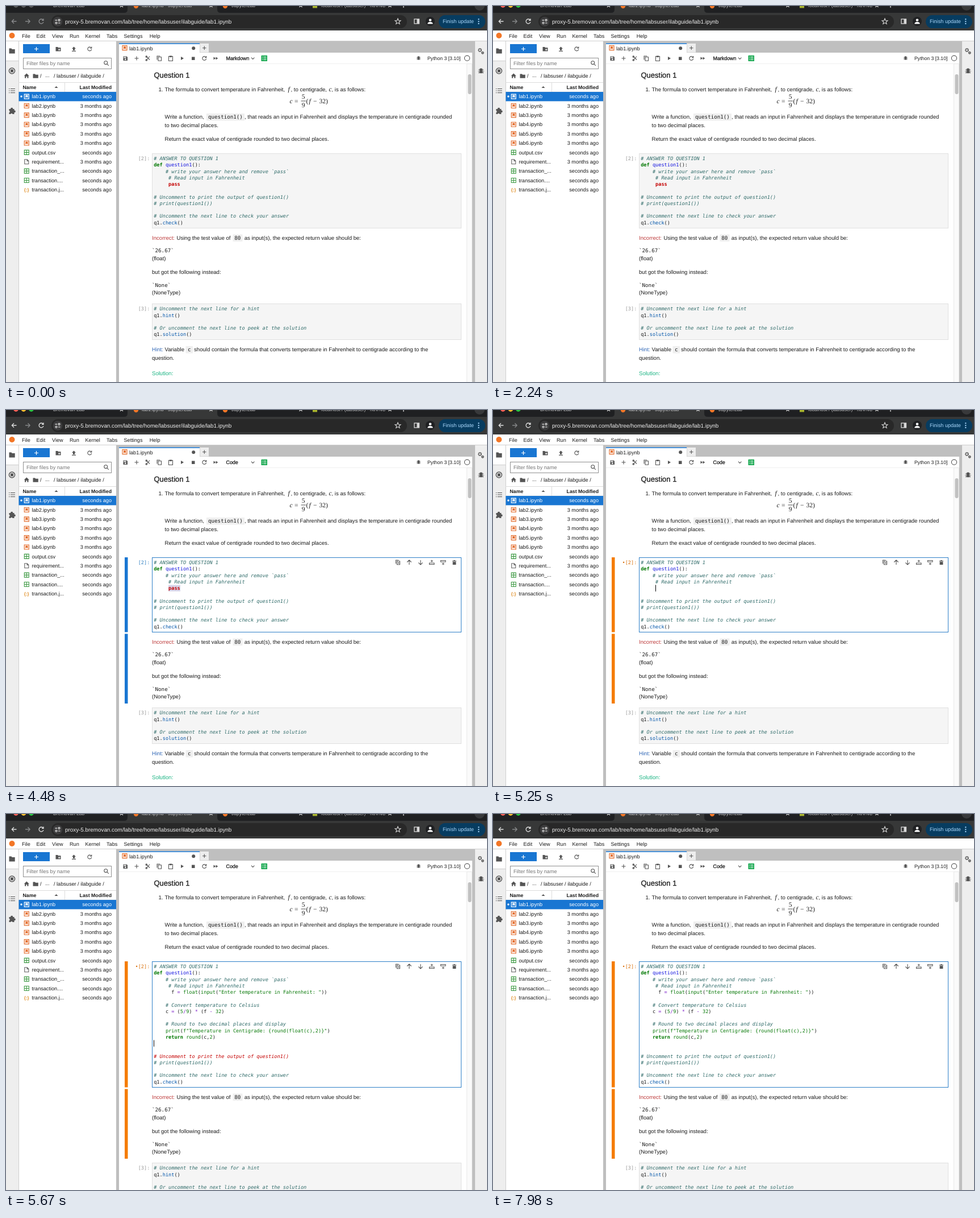
An HTML page that plays this animation: 847x661 px, repeating every 8000 ms.

```html
<!DOCTYPE html>
<html lang="en">
<head>
<meta charset="utf-8">
<title>Notebook lab</title>
<style>
html, body { margin: 0; width: 100%; height: 100%; overflow: hidden; background: #fff; }
svg { display: block; width: 847px; height: 661px; text-rendering: geometricPrecision; }
text { font: 9.15px "Liberation Sans", Arial, sans-serif; fill: #1c1c1c; white-space: pre; }
.tab { font-size: 8.5px; fill: #c6c7c9; }
.url { font-size: 9.85px; fill: #ececec; }
.bold { font-size: 8.75px; font-weight: 700; }
.medium { stroke: #1c1c1c; stroke-width: .3px; }
.end { text-anchor: end; }
.body text { font-size: 9.6px; }
.body text.serif { font: 11.5px "Liberation Serif", Times, serif; }
.body text.it { font-style: italic; }
.body text.title { font-size: 13px; }
.body text.mono { font: 9.2px "DejaVu Sans Mono", monospace; }
.body text.code { font: 8.6px "DejaVu Sans Mono", monospace; }
.body text.prompt { fill: #9a9a9a; }
.com { fill: #2f6b69; font-style: italic; }
.key { fill: #007800; font-weight: 700; }
.bad { fill: #c40000; font-weight: 700; }
.str, .fun, .num { fill: #0a7a0a; }
.def { fill: #1414e0; }
.prop { fill: #0055aa; }
.op { fill: #7d1fc8; }
.chip { fill: #efefef; }
.line { fill: none; stroke: #555; stroke-width: 1.1; }
.solid { fill: #555; }
.pale { fill: none; stroke: #d8d8d8; stroke-width: 1.3; }

.lamp, #nav, #cell, #bar1, #bar2, #lower, #prompt, #dot, #select, #caret,
.before, .after, #pass, #added, #warn tspan { animation: 8s step-end infinite; }

.lamp { fill: #57585a; animation-name: lamp; }
@keyframes lamp { 28% { fill: var(--on); } }
#nav { stroke: #8a8b8d; animation-name: nav; }
@keyframes nav { 28% { stroke: #dedede; } }

.before { animation-name: before; }
@keyframes before { 0% { opacity: 1; } 35% { opacity: 0; } }
.after { opacity: 0; animation-name: after; }
@keyframes after { 35% { opacity: 1; } }

#cell { fill: #f5f5f5; stroke: #e0e0e0; height: 131px; animation-name: cell, cellgrow; }
@keyframes cell { 35% { fill: #fff; stroke: #2f80c8; } }
@keyframes cellgrow { 70.875% { height: 221px; } }
#bar1 { height: 131.5px; }
#bar1, #bar2 { opacity: 0; fill: #1976d2; }
#bar1 { animation-name: bar, bargrow; }
#bar2 { animation-name: bar; }
@keyframes bar {
  35% { opacity: 1; fill: #1976d2; }
  65.625% { opacity: 1; fill: #f57c00; }
}
@keyframes bargrow { 70.875% { height: 221.5px; } }
#prompt { animation-name: prompt; }
@keyframes prompt { 35% { fill: #307fc1; } 65.625% { fill: #d9700c; } }
#dot { opacity: 0; fill: #d9700c; animation-name: dot; }
@keyframes dot { 65.625% { opacity: 1; } }

#pass { animation-name: pass; }
@keyframes pass { 0% { opacity: 1; } 65.625% { opacity: 0; } }
#select { opacity: 0; fill: #d8d5ea; animation-name: pick; }
@keyframes pick { 56% { opacity: 1; } 65.625% { opacity: 0; } }
#added { opacity: 0; animation-name: added; }
@keyframes added { 70.875% { opacity: 1; } }
#lower { animation-name: lower; }
@keyframes lower { 70.875% { transform: translateY(90px); } }
#warn tspan { animation-name: warn; }
@keyframes warn { 70% { fill: #c40000; } 76.125% { fill: #2f6b69; } }

#caret { opacity: 0; animation-name: caret; }
@keyframes caret {
  35% { opacity: 1; transform: translate(410px, 296px); }
  42% { opacity: 0; transform: translate(410px, 296px); }
  49% { opacity: 1; transform: translate(410px, 296px); }
  50.75% { opacity: 1; transform: translate(291px, 307.5px); }
  56% { opacity: 0; transform: translate(291px, 307.5px); }
  65.625% { opacity: 1; transform: translate(286px, 307.5px); }
  70.875% { opacity: 1; transform: translate(260px, 397.5px); }
  77.875% { opacity: 0; transform: translate(260px, 397.5px); }
  84.875% { opacity: 1; transform: translate(260px, 397.5px); }
  91.875% { opacity: 0; transform: translate(260px, 397.5px); }
  92.75% { opacity: 1; transform: translate(296px, 307.5px); }
  99.75% { opacity: 0; transform: translate(296px, 307.5px); }
}
</style>
</head>
<body>
<svg viewBox="0 0 847 661">
  <!-- browser chrome -->
  <path fill="#1f2022" d="M0 0H847V12H0z"/>
  <path fill="#373838" d="M0 12H208q6 0 6-6V0H372V6q0 6 6 6H847V43H0z"/>
  <circle class="lamp" style="--on:#fe5f57" cx="17.5" cy="-1.5" r="4.4"/>
  <circle class="lamp" style="--on:#febc2e" cx="31" cy="-1.5" r="4.4"/>
  <circle class="lamp" style="--on:#28c840" cx="44.5" cy="-1.5" r="4.4"/>
  <text class="tab" x="83" y="2.2">Bremovan Lab</text>
  <circle cx="229" cy="0" r="4.2" fill="#f37626"/>
  <text class="tab" x="239" y="2.2">lab1.ipynb - JupyterLab</text>
  <circle cx="386" cy="0" r="4.2" fill="#f37626"/>
  <text class="tab" x="397" y="2.2">JupyterLab</text>
  <rect x="540" y="-4" width="8" height="7.5" fill="#a9b42c"/>
  <text class="tab" x="555" y="2.2">localhost / (labsuser) - noVNC</text>
  <path class="pale" d="M201 -3l5 5m0-5l-5 5M358.5-3l5 5m0-5l-5 5M516.5-3l5 5m0-5l-5 5M673.5-3l5 5m0-5l-5 5M700 -4v7"/>
  <circle cx="834" cy="-1" r="9" fill="#38393b"/>
  <g id="nav" fill="none" stroke-width="1.3">
    <path d="M18.5 27H10.5M14 23.2L10.3 27L14 30.8"/>
    <path d="M65.5 24.8a4 4 0 1 0 .5 3.3M66 22.3v3h-3"/>
  </g>
  <path class="pale" style="stroke:#858688" d="M34 27h8M38.5 23.2L42.2 27L38.5 30.8"/>
  <rect x="80" y="16" width="626" height="23" rx="11.5" fill="#282828"/>
  <circle cx="91" cy="27.5" r="8.5" fill="#3c3c3d"/>
  <path class="pale" d="M86.5 25h3.5M92 29.8h3.5"/>
  <circle class="pale" cx="93.5" cy="25" r="1.5"/>
  <circle class="pale" cx="88.5" cy="29.8" r="1.5"/>
  <text class="url" x="104" y="30.6">proxy-5.bremovan.com/lab/tree/home/labsuser/ilabguide/lab1.ipynb</text>
  <path class="pale" id="star" style="stroke-width:1.1"/>
  <rect class="pale" x="719" y="23" width="8.5" height="8"/>
  <path fill="#d8d8d8" d="M723.5 23h4v8h-4z"/>
  <circle cx="747" cy="27" r="8" fill="#1f2022"/>
  <circle cx="747" cy="24.8" r="2.3" fill="#fff"/>
  <path fill="#fff" d="M742.3 31.5q0-3.5 4.7-3.5t4.7 3.5z"/>
  <rect x="762" y="16" width="82" height="23" rx="11.5" fill="#073c60"/>
  <text x="769" y="30.3" style="fill:#a9d7fb">Finish update</text>
  <path fill="#a9d7fb" d="M831.3 22.3h2v2h-2zM831.3 26.2h2v2h-2zM831.3 30.1h2v2h-2z"/>

  <!-- workspace -->
  <path fill="#eee" d="M0 62H22V661H0zM826 62H847V661H826z"/>
  <path fill="#fff" d="M0 62H22V96H0z"/>
  <path stroke="#cfcfcf" d="M0 61.5H847M0 96.5H22M22.5 62V661"/>
  <path fill="#bfbfbf" d="M194 62H826V661H194z"/>
  <path fill="#fff" d="M199 82H821V661H199zM199 65.5H341V82H199z"/>
  <path fill="#1976d2" d="M199 65.5H341V67H199z"/>
  <path fill="#ededed" d="M341.5 66H357V81.5H341.5z"/>
  <circle cx="10.5" cy="52" r="5" fill="#f37626"/>
  <g id="menu"></g>

  <!-- side icons -->
  <path class="solid" d="M5.5 74.5h4l1.2 1.5h5v7.5H5.5z"/>
  <circle cx="10.5" cy="114" r="5.8" fill="#555"/>
  <circle cx="10.5" cy="114" r="4.3" fill="#eee"/>
  <path class="solid" d="M8 111.5h5v5H8z"/>
  <path class="line" d="M5 145.5h1.5M8 145.5h8M5 149h1.5M8 149h8M5 152.5h1.5M8 152.5h8"/>
  <path class="solid" d="M5.5 181h2.8a1.9 1.9 0 1 1 3.7 0h2.5v2.6a1.8 1.8 0 1 1 0 3.5v3h-3a1.7 1.7 0 0 0-3.3 0H5.5v-2.8a1.7 1.7 0 0 0 0-3.3z"/>
  <circle class="line" cx="834.5" cy="77.5" r="2.4" stroke-dasharray="1.5 .4" style="stroke-width:2"/>
  <circle class="line" cx="839.3" cy="82.3" r="1.6" style="stroke-width:1.6"/>
  <g id="bug"><path class="solid" d="M834 110.5q2.5-2 5 0v6q-2.5 4-5 0z"/><path class="line" d="M832 112h9M831.5 114.7h10M832 117.4h9"/></g>

  <!-- file browser -->
  <rect x="30" y="67" width="47" height="16" fill="#1976d2"/>
  <path stroke="#fff" stroke-width="1.2" d="M50 75.5h7M53.5 72v7"/>
  <path class="solid" d="M87.5 72h3.5l1.2 1.3h4.3v6.2h-9z"/>
  <path stroke="#fff" d="M92 76.7h3.5M93.7 75v3.5"/>
  <path class="solid" d="M119.5 71.5l3.5 3.7h-2v2.8h-3v-2.8h-2zM116 78.8h7v1.2h-7z"/>
  <path class="line" d="M150 73.5a3.4 3.4 0 1 0 .6 2.6M150.8 71.5v2.7h-2.7"/>
  <rect x="30.5" y="91.5" width="155" height="19" fill="#fff" stroke="#8f8f8f"/>
  <text x="36" y="104.3" style="fill:#757575">Filter files by name</text>
  <circle class="line" cx="175.7" cy="99.7" r="2.9"/>
  <path class="line" d="M177.8 101.8l3 3"/>
  <path class="solid" d="M31.8 122.8l4.5-4.3l4.5 4.3h-1.3v3.9h-2.2v-2.7h-2v2.7h-2.2v-3.9z"/>
  <path class="solid" d="M47.5 119.5h3.5l1.2 1.3h4.6v6h-9.3z"/>
  <text x="60" y="125.8">/</text>
  <text x="69" y="125">...</text>
  <text x="84" y="125.8">/ labsuser / ilabguide /</text>
  <path stroke="#dcdcdc" d="M22 134.5H194M22 151H194M103.5 135V151"/>
  <text class="bold" x="29.5" y="146">Name</text>
  <path class="solid" d="M85.5 144l3-3l3 3z"/>
  <text class="bold end" x="186" y="146">Last Modified</text>
  <rect x="22.5" y="151" width="171.5" height="16.4" fill="#1976d2"/>
  <circle cx="27" cy="159" r="1.7" fill="#fff"/>
  <g id="files"></g>

  <!-- notebook tab and toolbar -->
  <g id="tabicon"></g>
  <text x="217" y="77.5">lab1.ipynb</text>
  <circle class="solid" cx="330.2" cy="74.2" r="3"/>
  <path class="line" d="M346 73.7h6.5M349.3 70.5v6.5"/>
  <path class="solid" d="M206.5 88.5h6l1.5 1.5v6h-7.5z"/>
  <path fill="#fff" d="M207.5 89.5h4v1.8h-4zM209 92.6h2.5v2.2h-2.5z"/>
  <path class="line" d="M226.5 92h7M230 88.5v7"/>
  <path class="line" d="M246.5 88l6.5 6.5M246.5 96l6.5-7.5"/>
  <circle class="line" cx="247.3" cy="89" r="1.3"/><circle class="line" cx="247.3" cy="95" r="1.3"/>
  <path class="line" d="M266 94.5v-6.5h5.5M268 89.8h5.5v6.5h-5.5z"/>
  <path class="line" d="M286.5 88.5h7v8h-7z"/><path class="solid" d="M288 87.5h4v2.5h-4z"/>
  <path class="solid" d="M308 89l5 3l-5 3zM327 89.5h5.5v5.5h-5.5zM365.5 89.5l3.8 2.5l-3.8 2.5zM369.5 89.5l3.8 2.5l-3.8 2.5z"/>
  <path class="line" d="M352 90a3.4 3.4 0 1 0 .6 2.6M352.8 88v2.7h-2.7"/>
  <text class="medium before" x="387.5" y="94.6" style="font-size:8.9px">Markdown</text>
  <text class="medium after" x="387.5" y="94.6" style="font-size:8.9px">Code</text>
  <path class="line" d="M432 90.7l2.7 2.7l2.7-2.7"/>
  <rect x="449.5" y="87" width="10.5" height="10" fill="#0fa54a"/>
  <path stroke="#fff" d="M451 89.5h1.5M453.5 89.5h5M451 92h1.5M453.5 92h5M451 94.5h1.5M453.5 94.5h5"/>
  <use href="#bug" transform="translate(132.6 10.6) scale(.71)"/>
  <text x="742" y="95" style="font-size:8.7px">Python 3 [3.10]</text>
  <circle class="line" cx="812" cy="91.7" r="4.6"/>
  <path stroke="#f0f0f0" d="M199 101.5H811"/>
  <path fill="#fafafa" stroke="#e8e8e8" d="M811.5 101.5H820.5V662H811.5z"/>
  <rect x="813.5" y="120" width="6" height="35" rx="3" fill="#c1c1c1"/>

  <!-- notebook -->
  <g class="body">
    <text class="title medium" x="260.5" y="126.3">Question 1</text>
    <text x="268.5" y="149.5">1.</text>
    <text x="279.5" y="149.5">The formula to convert temperature in Fahrenheit,</text>
    <text class="serif it" x="496.5" y="149.7">f</text>
    <text x="501.5" y="149.5">, to centigrade,</text>
    <text class="serif it" x="568.5" y="149.7">c</text>
    <text x="573.5" y="149.5">, is as follows:</text>
    <text class="serif it" x="499.5" y="170.5">c</text>
    <text class="serif" x="508" y="170.5">=</text>
    <text class="serif" x="520.7" y="163">5</text>
    <path stroke="#222" stroke-width=".8" d="M519.5 167H528"/>
    <text class="serif" x="520.7" y="178">9</text>
    <text class="serif" x="528.5" y="170.5">(</text>
    <text class="serif it" x="533.5" y="170.5">f</text>
    <text class="serif" x="541" y="170.5">−</text>
    <text class="serif" x="551.5" y="170.5">32)</text>
    <text x="279.5" y="198.3">Write a function,</text>
    <rect class="chip" x="353" y="189" width="67" height="12.5"/>
    <text class="mono" x="356" y="198">question1()</text>
    <text x="420" y="198.3">, that reads an input in Fahrenheit and displays the temperature in centigrade rounded</text>
    <text x="279.5" y="213.3">to two decimal places.</text>
    <text x="279.5" y="237.2">Return the exact value of centigrade rounded to two decimal places.</text>

    <rect id="bar1" x="209" y="259" width="5.5"/>
    <text class="code" id="dot" x="227.5" y="271.1">•</text>
    <text class="code prompt" id="prompt" x="232.7" y="271.1">[2]:</text>
    <rect id="cell" x="257.5" y="259.5" width="544"/>
    <rect id="select" x="286" y="307.5" width="21" height="11.3"/>
    <g id="head"></g>
    <g id="pass"></g>
    <g id="added"></g>
    <g class="after">
      <path class="line" d="M686.5 270v-6h5M688.5 265.8h5v6h-5zM690 268.8h2.5M691.2 267.5v2.6"/>
      <path class="line" d="M710 272v-8M706.3 267.5l3.7-3.7l3.7 3.7M730 264v8M726.3 268.3l3.7 3.7l3.7-3.7"/>
      <path class="line" d="M745.5 269h8.5v2.5h-8.5zM749.8 263.5v4M747.8 265.5h4"/>
      <path class="line" d="M765.5 264.5h8.5v2.5h-8.5zM769.8 268.5v4M767.8 270.5h4"/>
      <path class="solid" d="M786 265h2l.6-1h1.8l.6 1h2v1.2h-7zM786.6 267h5.8v5h-5.8z"/>
    </g>
    <g id="lower">
      <rect id="bar2" x="209" y="393.5" width="5.5" height="122.5"/>
      <g id="warn"></g>
      <g id="tail"></g>
      <text x="257" y="410.7" style="fill:#bd3b3b">Incorrect:</text>
      <text x="300.5" y="410.7">Using the test value of</text>
      <rect class="chip" x="399.5" y="401.5" width="17" height="12.5"/>
      <text class="mono" x="402.3" y="410.7">80</text>
      <text x="419.7" y="410.7">as input(s), the expected return value should be:</text>
      <text class="mono" x="257" y="433.2">`26.67`</text>
      <text x="257" y="446.5">(float)</text>
      <text x="257" y="470.9">but got the following instead:</text>
      <text class="mono" x="257" y="493.6">`None`</text>
      <text x="257" y="506.9">(NoneType)</text>
      <text class="code prompt" x="232.7" y="535.3">[3]:</text>
      <rect x="257.5" y="523.5" width="544" height="63" fill="#f5f5f5" stroke="#e0e0e0"/>
      <g id="hint"></g>
      <text x="257" y="607.3" style="fill:#2f66b5">Hint:</text>
      <text x="279.5" y="607.3">Variable</text>
      <rect class="chip" x="316.5" y="598" width="12.5" height="12.5"/>
      <text class="mono" x="320" y="607.3">c</text>
      <text x="331" y="607.3">should contain the formula that converts temperature in Fahrenheit to centigrade according to the</text>
      <text x="257" y="622">question.</text>
      <text x="257" y="648.5" style="fill:#46c29a;stroke:#46c29a;stroke-width:.2px">Solution:</text>
    </g>
    <rect id="caret" width="1" height="11.5" fill="#000"/>
  </g>
</svg>
<script>
const $ = id => document.getElementById(id);
const text = (x, y, str, cls = '', extra = '') =>
  `<text x="${x}" y="${y}" class="${cls}" ${extra}>${str}</text>`;

// Syntax colours: one capture group per class
const kinds = ['com', 'str', 'bad', 'key', 'fun', 'def', 'prop', 'num', 'op'];
const syntax = /(#.*)|(f?"[^"]*")|\b(pass)\b|\b(def|return)\b|\b(print|float|input|round)\b|(?<=def )(\w+)|(?<=\.)(\w+)|\b(\d+)\b|([-+*\/=])/g;
const paint = line => line.replace(syntax, (all, ...found) =>
  `<tspan class="${kinds[found.findIndex((part, i) => i < kinds.length && part)]}">${all}</tspan>`);

function code(id, row, lines, top = 271.1) {
  $(id).innerHTML = lines.map((line, i) =>
    text(260.2, top + (row + i) * 11.26, paint(line), 'code')).join('');
}

code('head', 0, [
  '# ANSWER TO QUESTION 1',
  'def question1():',
  '    # write your answer here and remove `pass`',
  '     # Read input in Fahrenheit'
]);
code('pass', 4, ['     pass']);
code('added', 4, [
  '      f = float(input("Enter temperature in Fahrenheit: "))',
  '',
  '    # Convert temperature to Celsius',
  '    c = (5/9) * (f - 32)',
  '',
  '    # Round to two decimal places and display',
  '    print(f"Temperature in Centigrade: {round(float(c),2)}")',
  '    return round(c,2)'
]);
code('warn', 6, ['# Uncomment to print the output of question1()']);
code('tail', 7, [
  '# print(question1())',
  '',
  '# Uncomment the next line to check your answer',
  'q1.check()'
]);
code('hint', 0, [
  '# Uncomment the next line for a hint',
  'q1.hint()',
  '',
  '# Or uncomment the next line to peek at the solution',
  'q1.solution()'
], 535.3);

const menu = { File: 28, Edit: 53.5, View: 81, Run: 112, Kernel: 139.5, Tabs: 177, Settings: 207.5, Help: 252.7 };
$('menu').innerHTML = Object.entries(menu).map(([name, x]) => text(x, 55.5, name)).join('');

// File icons are drawn around their centre
const book = color => `<path fill="none" stroke="${color}" stroke-width="1.2" d="M-4-4H4V4H-4z"/>
  <path fill="${color}" d="M-2-2.5H2.2V2.5L.1 .8L-2 2.5z"/>`;
const icons = {
  book: book('#e46e2e'),
  picked: book('#fff'),
  grid: '<path fill="none" stroke="#3f9a45" stroke-width="1.1" d="M-4-4H4V4H-4zM-4 0H4M0-4V4"/>',
  page: '<path fill="none" stroke="#616161" stroke-width="1.1" d="M-3.5-4H1L3.5-1.5V4H-3.5zM.8-4V-1.2H3.5"/>',
  json: '<text x="-4.5" y="2.8" style="font-size:8px;font-weight:700;fill:#e0912a">{:}</text>'
};
const icon = (kind, x, y) => `<g transform="translate(${x} ${y})">${icons[kind]}</g>`;

const labs = [1, 2, 3, 4, 5, 6].map(n => [n > 1 ? 'book' : 'picked', `lab${n}.ipynb`]);
const files = [...labs, ['grid', 'output.csv'], ['page', 'requirement...'],
  ['grid', 'transaction_...'], ['grid', 'transaction....'], ['json', 'transaction.j...']];
$('files').innerHTML = files.map(([kind, name], i) => {
  const y = 159.1 + i * 16.38;
  const fill = i ? '' : 'style="fill:#fff"';
  const old = kind === 'book' || kind === 'page';
  return icon(kind, 36.3, y) + text(45.5, y + 3.2, name, '', fill) +
    text(186, y + 3.2, old ? '3 months ago' : 'seconds ago', 'end', fill);
}).join('');
$('tabicon').innerHTML = icon('book', 209, 73.7);

const points = Array.from({ length: 10 }, (_, i) => {
  const r = i % 2 ? 2.3 : 5.3, a = i * Math.PI / 5;
  return [690 + r * Math.sin(a), 27.3 - r * Math.cos(a)].map(v => v.toFixed(2));
});
$('star').setAttribute('d', 'M' + points.join('L') + 'z');
</script>
</body>
</html>
```
